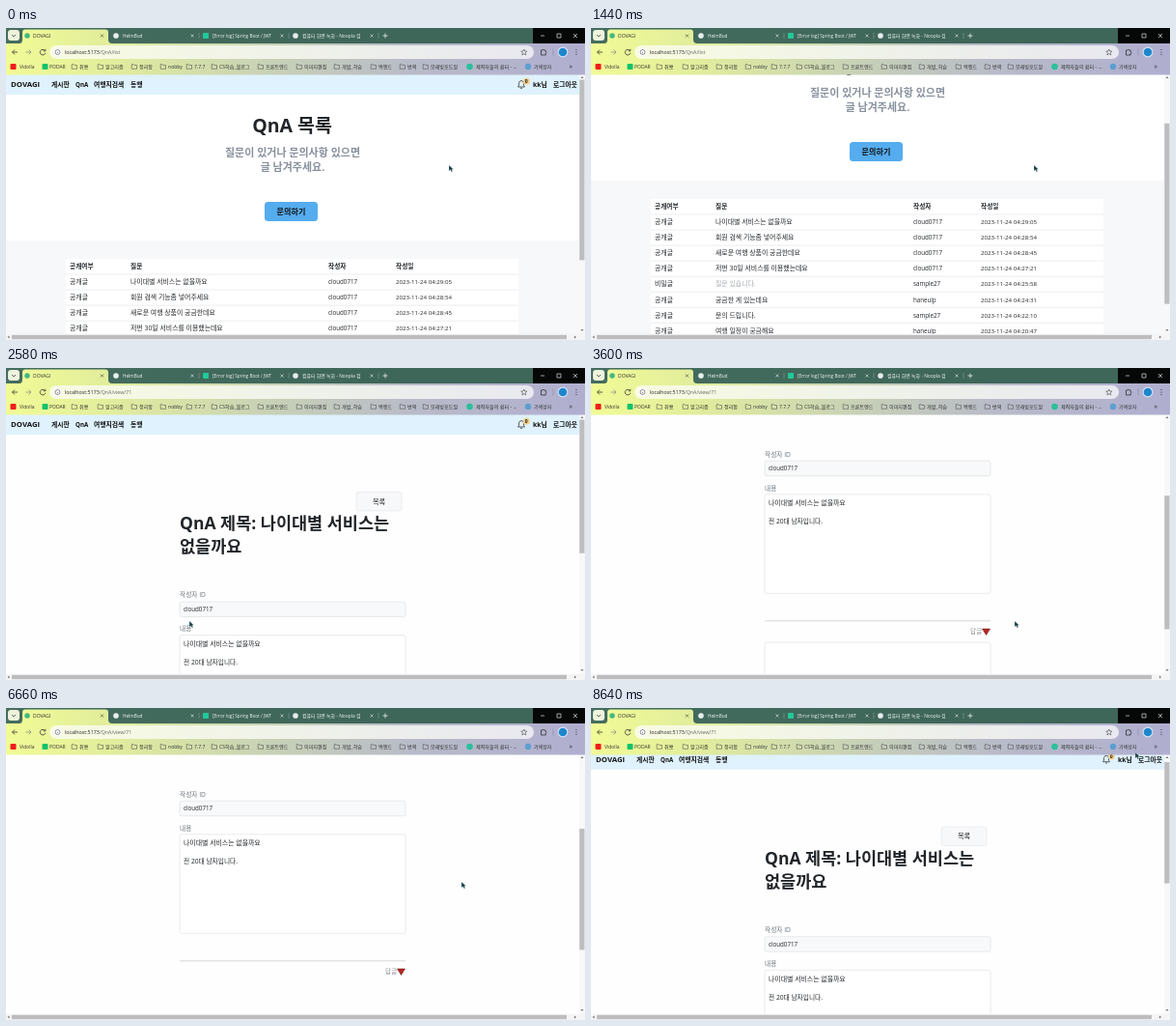
Animation, 600 px wide and 323 px high, one loop 8.7 s. Source, as an HTML page:

```html
<!DOCTYPE html>
<html lang="ko">
<head>
<meta charset="utf-8">
<title>QnA</title>
<style>
html, body { margin: 0; width: 100%; height: 100%; overflow: hidden; background: #fff; }
svg { display: block; width: 100vw; height: 100vh; }
text { font-family: "Open Sans", "Noto Sans CJK KR", "Noto Sans CJK", sans-serif; white-space: pre; }
</style>
</head>
<body>
<svg id="stage" viewBox="0 0 600 323"></svg>
<script>
const LOOP = 8700, OPEN_VIEW = 2500, OPEN_REPLY = 3350, FOCUS = 4800, SUBMIT = 6050, SHOW_REPLY = 7150;
const USER = 'cloud0717', REPLY = '좋은 의견 감사합니다.', BRAND = 'DOVAGI';

// Drawing helpers
const text = (x, y, s, size = 6.9, fill = '#212529', weight = 400, anchor = 'start') =>
  `<text x="${x}" y="${y}" font-size="${size}" fill="${fill}" font-weight="${weight}" text-anchor="${anchor}">${s}</text>`;
const rect = (x, y, w, h, fill, r = 0, stroke = 'none') =>
  `<rect x="${x}" y="${y}" width="${w}" height="${h}" rx="${r}" fill="${fill}" stroke="${stroke}" stroke-width=".6"/>`;
const dot = (x, y, r, fill) => `<circle cx="${x}" cy="${y}" r="${r}" fill="${fill}"/>`;
const line = (d, stroke, w = .7) => `<path d="${d}" fill="none" stroke="${stroke}" stroke-width="${w}"/>`;
const shape = (d, fill) => `<path d="${d}" fill="${fill}"/>`;
const group = (id, body) => `<g id="${id}">${body}</g>`;
const gradient = (id, stops) => `<linearGradient id="${id}" gradientUnits="userSpaceOnUse" x1="0" y1="0" x2="600" y2="0">` +
  stops.map(([o, c]) => `<stop offset="${o}" stop-color="${c}"/>`).join('') + '</linearGradient>';

function nav() {
  const links = [[47, '게시판'], [72, 'QnA'], [91, '여행지검색'], [129, '동행'], [546, 'kk님'], [567, '로그아웃']];
  return rect(0, 48, 594, 21, '#dff2fd') + text(5, 61.2, BRAND, 7.8, '#111', 700) +
    links.map(([x, s]) => text(x, 60.8, s, s === 'QnA' ? 6.2 : 6.8, '#111', 700)).join('') +
    line('M530.5 61H537.5L536.5 59.5V57Q536 54.5 534 54.5T531.5 57V59.5ZM533 62.3H535', '#222') +
    dot(539.3, 55.2, 3.5, '#f3cf8b') + text(539.3, 57, '0', 5, '#222', 700, 'middle');
}

function listPage() {
  const rows = [
    ['나이대별 서비스는 없을까요', USER, '04:29:05'],
    ['회원 검색 기능좀 넣어주세요', USER, '04:28:54'],
    ['새로운 여행 상품이 궁금한데요', USER, '04:28:45'],
    ['저번 30일 서비스를 이용했는데요', USER, '04:27:21'],
    ['질문 있습니다.', 'sample27', '04:25:58'],
    ['궁금한 게 있는데요', 'haneulp', '04:24:31'],
    ['문의 드립니다.', 'sample27', '04:22:10'],
    ['여행 일정이 궁금해요', 'haneulp', '04:20:47']
  ];
  const columns = [[66, '공개여부'], [129, '질문'], [334, '작성자'], [404, '작성일']];
  return rect(0, 48, 594, 400, '#fff') + rect(0, 220, 594, 230, '#f6f8fa') + nav() +
    text(296.5, 108, 'QnA 목록', 19.5, '#212529', 700, 'middle') +
    text(297, 132.5, '질문이 있거나 문의사항 있으면', 11, '#87909d', 700, 'middle') +
    text(297, 148, '글 남겨주세요.', 11, '#87909d', 700, 'middle') +
    rect(268, 180, 55, 20, '#55acee', 3.5) + text(295.5, 193, '문의하기', 8.1, '#111', 700, 'middle') +
    rect(62, 239, 469, 16 * (rows.length + 1), '#fff') +
    columns.map(([x, s]) => text(x, 249.2, s, 6.7, '#212529', 700)).join('') +
    rows.map(([title, who, time], i) => {
      const y = 265.2 + 16.06 * i, hidden = i === 4;
      return line(`M62 ${y - 10.2}H531`, '#dee2e6', .6) + text(66, y, hidden ? '비밀글' : '공개글') +
        text(129, y, title, 6.9, hidden ? '#a5a9ad' : '#212529') +
        text(334, y, who, 6.2) + text(404, y, '2023-11-24 ' + time, 6.15);
    }).join('');
}

function viewPage() {
  const label = '#6c757d', border = '#d9dde1';
  return rect(0, 48, 594, 520, '#fefefe') + nav() + '<g transform="translate(0 5.3)">' +
    rect(363, 123, 47, 19.5, '#f7f8f9', 2.5, '#e2e4e7') + text(386.5, 135.4, '목록', 7.2, '#212529', 400, 'middle') +
    text(180, 162, 'QnA 제목: 나이대별 서비스는', 17.5, '#212529', 700) +
    text(180, 186, '없을까요', 17.5, '#212529', 700) +
    text(180, 232.2, '작성자 ID', 6.7, label) +
    rect(180, 236.7, 234, 15.5, '#f8f9fa', 2, border) + text(184, 246.8, USER, 6.2) +
    text(180, 267.2, '내용', 6.7, label) + rect(180, 271.3, 234, 102.5, '#fff', 2, border) +
    text(184, 282.8, '나이대별 서비스는 없을까요') + text(184, 301.8, '전 20대 남자입니다.', 6.7) +
    line('M180 402.3H414', '#c9c5c6') + text(393, 415.3, '답글', 6.7, '#8a8f94') +
    '<path id="toggle" d="M405.5 410.5H413.5L409.5 417Z" stroke="#611" stroke-width=".5"/>' +
    group('answer', rect(180, 424.5, 234, 16, '#f8f9fa', 2, border) + text(184, 435, REPLY)) +
    group('editor', rect(180, 424.5, 234, 55.5, '#fff', 2, border) +
      '<text id="typed" x="184" y="436" font-size="6.9" fill="#212529"></text>' +
      '<path id="caret" d="M0 429V437.5" stroke="#333" stroke-width=".6"/>' +
      group('helper', '<circle cx="406" cy="473" r="6.5" fill="#fff" stroke="#dde" stroke-width=".5"/>' + dot(406, 473, 4, '#14273d')) +
      rect(391, 482, 21, 13, '#55acee', 3) + text(401.5, 490.9, '작성', 6.8, '#111', 700, 'middle')) + '</g>';
}

function tabs() {
  const others = [[114, 'HelmBud', '#e8efec'], [207, '[Error log] Spring Boot / JWT', '#20c997'], [300, '컴퓨터 화면 녹화 - Noopla 검', '#e7ebee']];
  const cross = (x, c) => line(`M${x - 1.5} 6.5l3 3m0 -3l-3 3`, c, .6);
  return rect(0, 0, 546, 16, 'url(#strip)') + rect(546, 0, 54, 16, '#060808') +
    rect(2, 2, 12, 11, '#eef3dc', 3) + line('M6 7l2 2l2 -2', '#333') +
    shape('M14 16Q17 16 17 12V4.5Q17 1.5 20 1.5H103Q106 1.5 106 4.5V12Q106 16 110 16Z', 'url(#bar)') +
    dot(22, 8, 2.7, '#41b883') + text(28, 10, BRAND, 5, '#333') + cross(99.5, '#333') +
    others.map(([x, s, c], i) => (i === 1 ? rect(x - 3, 5, 6, 6, c, 1) : dot(x, 8, 2.8, c)) +
      text(x + 7, 10, s, i === 2 ? 4.9 : 4.7, '#f3f7f5') + cross(x + 79, '#e3ebe7') +
      (i < 2 ? line(`M${x + 86} 5V11`, '#83a096', .6) : '')).join('') +
    line('M386 5V11', '#83a096', .6) + line('M390.5 8h5m-2.5 -2.5v5', '#fff') +
    line('M554 8h4M571 6h4v4h-4zM588 6l4 4m0 -4l-4 4', '#fff', .6);
}

function toolbar() {
  return rect(0, 15.5, 600, 33, 'url(#bar)') +
    line('M12 25H6.5M9 22.5L6.5 25L9 27.5', '#333', .8) + line('M20.5 25H26M23.5 22.5L26 25L23.5 27.5', '#8b9480', .8) +
    line('M40.2 23.3A2.8 2.8 0 1 0 40.8 25.8M40.8 21.8V23.8H38.8', '#333', .8) +
    rect(45, 18, 502, 14, 'url(#field)', 7) + dot(53.5, 25, 4.3, '#fff') +
    line('M51 25a2.5 2.5 0 1 0 5 0a2.5 2.5 0 1 0 -5 0M53.5 24.7v1.5', '#444', .6) +
    '<text x="61" y="27" font-size="5.3" fill="#222">localhost:5173<tspan id="path" fill="#666"></tspan></text>' +
    line('M536.8 22l.9 2 2.2 .2-1.7 1.5 .5 2.2-1.9-1.2-1.9 1.2 .5-2.2-1.7-1.5 2.2-.2z', '#444', .6) +
    line('M554.5 23h1.5q.8-2 1.6 0h1.6v1.6q2 .8 0 1.6V28h-4.7z', '#333', .8) + line('M567 21.5V28.5', '#8888a2', .6) +
    dot(577, 25, 5.4, '#d9e6f5') + dot(577, 25, 4.3, '#1f86cc') +
    [22.5, 25, 27.5].map(y => dot(591, y, .6, '#333')).join('') + bookmarks();
}

function bookmarks() {
  const folders = [[76, '취뽀'], [103, '알고리즘'], [138, '정리함'], [168, 'nobby'], [195, '7.7.7'], [221, 'CS학습_블로그'],
    [269, '프론트엔드'], [309, '이미지편집'], [348, '개발_학습'], [386, '백엔드'], [416, '번역'], [440, '모래빛포도알']];
  const sites = [[14, 'Vidolla', 5], [45, 'PODAR', 5], [487, '제작자들의 쉼터 - ...', 5.1], [547, '기색상자', 5]];
  return rect(4.5, 37, 6, 6, '#ef1c1c', 1) + rect(37.5, 37, 6, 6, '#13c26b', 1) +
    dot(480.5, 40, 3.3, '#2bbf9b') + dot(541, 40, 3.2, '#5c9fd0') +
    sites.map(([x, s, z]) => text(x, 41.9, s, z, '#333')).join('') +
    folders.map(([x, s]) => line(`M${x - 7.8} 42.3v-4.6h2l.7 .8h2.6v3.8z`, '#555', .6) + text(x, 41.9, s, 5.1, '#333')).join('') +
    text(583.5, 42, '»', 7, '#333');
}

const scrollbars = () => rect(594, 48, 6, 269, '#f8f8f9') + rect(0, 316.7, 600, 6.3, '#f5f5f6') +
  '<rect id="thumb" x="594.3" width="5.2" fill="#bdbdbf"/>' + rect(6, 317.8, 575, 4.4, '#bdbdbf') +
  shape('M595.5 52l1.5 -2l1.5 2zM595.5 312l1.5 2l1.5 -2zM3.5 318.5v3l-2 -1.5zM589 318.5v3l2 -1.5z', '#777');

const stage = document.getElementById('stage');
stage.innerHTML = '<defs>' +
  gradient('strip', [[0, '#456d5f'], [.6, '#3e6659'], [1, '#3e6659']]) +
  gradient('bar', [[0, '#f1fb96'], [.18, '#e2ed9c'], [.45, '#c8d2b6'], [.7, '#b8bbc8'], [1, '#b0aed0']]) +
  gradient('field', [[0, '#fafde0'], [.45, '#f0f3e8'], [1, '#e7e6f2']]) + '</defs>' +
  group('list', listPage()) + group('view', viewPage()) + scrollbars() + toolbar() + tabs() +
  group('arrow', '<path d="M0 0V6L1.5 4.8L2.7 7L3.8 6.4L2.8 4.4L4.6 4.2Z" fill="#123c42" stroke="#dfe9ea" stroke-width=".3"/>') +
  group('beam', line('M-1.5 -3H1.5M0 -3V3M-1.5 3H1.5', '#111', .8));

const el = {};
stage.querySelectorAll('[id]').forEach(e => el[e.id] = e);
const show = (id, on) => el[id].setAttribute('display', on ? 'inline' : 'none');
const move = (id, x, y) => el[id].setAttribute('transform', `translate(${x} ${y})`);

// Motion keys: time, then values; eased between neighbours
const scrollKeys = [[0, 0], [682, 0], [962, 62], [1600, 62], [1917, 0], [2800, 0], [3150, 145.8], [4100, 145.8],
  [4350, 223.3], [6049, 223.3], [6050, 0], [6220, 0], [6520, 145.8], [8200, 145.8], [8640, 5.3], [8700, 0]];
const mouseKeys = [[0, 459, 142], [1500, 459, 142], [1800, 426, 160], [2300, 190, 262], [2600, 190, 262], [3250, 409, 271],
  [3400, 409, 271], [3600, 439, 262], [4000, 439, 262], [4700, 384, 247], [5350, 384, 247], [5850, 401, 270],
  [6080, 401, 270], [6500, 472, 180], [6700, 472, 180], [7050, 409, 271], [7300, 409, 271], [7900, 500, 150], [8640, 564, 46]];

function at(keys, t) {
  const i = keys.findIndex(k => k[0] > t);
  if (i < 0) return keys.at(-1).slice(1);
  const a = keys[i - 1], b = keys[i], u = (t - a[0]) / (b[0] - a[0]), e = u * u * (3 - 2 * u);
  return a.slice(1).map((v, n) => v + (b[n + 1] - v) * e);
}

function draw(t) {
  const [scroll] = at(scrollKeys, t), [x, y] = at(mouseKeys, t);
  const viewing = t >= OPEN_VIEW, focused = t >= FOCUS && t < SUBMIT, answered = t >= SHOW_REPLY;
  show('list', !viewing);
  show('view', viewing);
  move(viewing ? 'view' : 'list', 0, -scroll);
  el.path.textContent = viewing ? '/QnA/view/71' : '/QnA/list';

  const ratio = !viewing ? .73 : t < SUBMIT ? .54 : .49;
  el.thumb.setAttribute('y', 53.5 + scroll * ratio);
  el.thumb.setAttribute('height', 256 * ratio);

  show('editor', answered || t >= OPEN_REPLY && t < SUBMIT);
  show('answer', answered);
  move('editor', 0, answered ? 21 : 0);
  el.toggle.setAttribute('fill', t > 4000 && t < SUBMIT ? '#e81212' : '#b3261e');

  const count = focused ? Math.max(0, Math.floor((t - 5200) / 50)) : 0;
  el.typed.textContent = REPLY.slice(0, count);
  show('helper', focused);
  show('caret', focused && (t - FOCUS) % 1060 < 530);
  move('caret', 184 + (count ? el.typed.getComputedTextLength() : 0), 0);

  const overText = t >= 4600 && t < 5700;
  show('arrow', !overText);
  show('beam', overText);
  move(overText ? 'beam' : 'arrow', x, y);
}

const start = performance.now();
function tick() {
  draw((performance.now() - start) % LOOP);
  requestAnimationFrame(tick);
}
tick();
</script>
</body>
</html>
```
